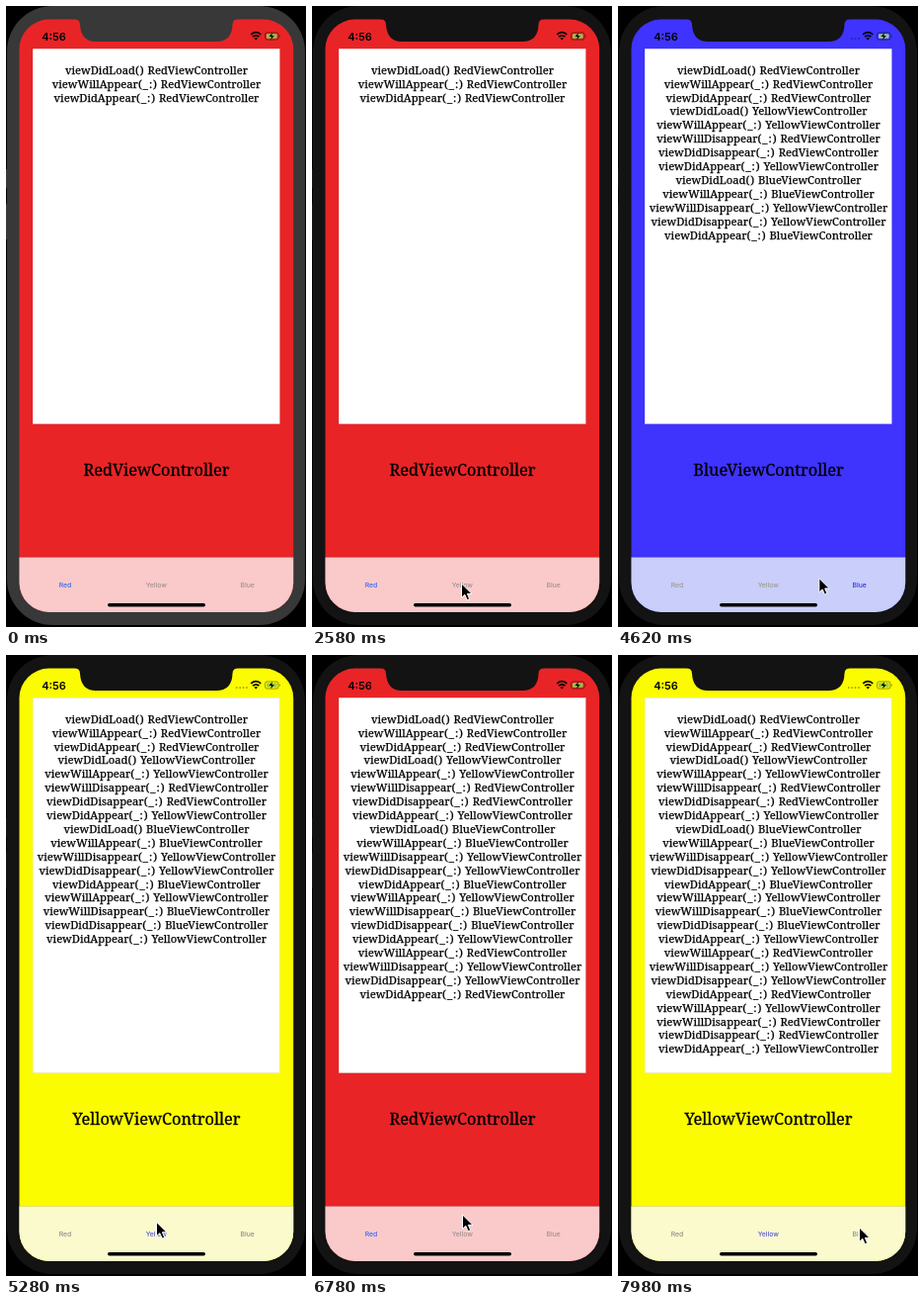
Recreate the animation shown at these times as an HTML page. Size 304 px wide and 628 px high, loop 8000 ms.

```html
<!DOCTYPE html>
<html lang="en">
<head>
<meta charset="utf-8">
<title>View controller life cycle</title>
<style>
html, body { margin: 0; width: 100%; height: 100%; overflow: hidden; background: #000; }
svg { display: block; width: 100%; height: 100%; }
text { text-anchor: middle; }
.log { font: 11.2px "Noto Serif", serif; stroke: #000; stroke-width: .25px; }
.args { letter-spacing: 1px; }
.title { font: 16.35px "Noto Serif", serif; stroke: #000; stroke-width: .3px; }
.clock { font: 600 11px Inter, sans-serif; }
.tab { font: 500 6.8px Inter, sans-serif; }
</style>
</head>
<body>
<svg viewBox="0 0 304 628">
  <rect width="304" height="628" fill="#000"/>
  <g id="bezel">
    <rect x="0" y="165" width="2" height="19"/>
    <rect x="0" y="200" width="2" height="36"/>
    <rect x="1" y="0" width="302" height="626" rx="46"/>
  </g>
  <clipPath id="screen"><rect x="13.5" y="13.6" width="277.7" height="599.3" rx="30"/></clipPath>
  <g clip-path="url(#screen)">
    <rect id="page" x="13" y="13" width="279" height="600"/>
    <rect id="bar" x="13" y="557.5" width="279" height="56"/>
    <path d="M13 557.5H292" stroke="#000" stroke-opacity=".2" stroke-width=".5"/>
  </g>
  <path id="notch" d="M69 13Q75 13.5 75 19Q76 36 91 36H213Q229 36 229.5 19Q229.5 13.5 235.5 13Z"/>
  <rect x="27.1" y="43.2" width="250.4" height="379.5" fill="#fff" stroke="#000" stroke-opacity=".12" stroke-width=".5"/>
  <g id="log"></g>
  <text id="title" class="title" x="152.5" y="475.4"></text>
  <text class="clock" x="48.5" y="34.6">4:56</text>
  <g id="dots" fill="#000" fill-opacity=".35"></g>
  <g fill="none" stroke="#000" stroke-width="1.7">
    <path d="M248.2 28.8Q253.2 24.4 258.2 28.8"/>
    <path d="M250 31.2Q253.2 28.5 256.4 31.2"/>
  </g>
  <path d="M251.4 32.6Q253.2 31.2 255 32.6L253.2 34.6Z"/>
  <rect x="262.6" y="26.9" width="13.4" height="7.2" rx="2" fill="none" stroke="#000" stroke-opacity=".5" stroke-width=".8"/>
  <path d="M277.2 29V32Q278.6 30.5 277.2 29Z" fill-opacity=".6"/>
  <rect id="charge" x="264" y="28.2" width="10.6" height="4.6" rx="1"/>
  <path d="M270 27L266.5 31H269L268.2 34.2L271.8 29.9H269.3Z"/>
  <g id="tabs"></g>
  <rect x="103" y="604.1" width="99" height="3.4" rx="1.7"/>
  <path id="cursor" d="M0 0V14.4L3.3 11.3L5.7 16.7L8.2 15.6L5.9 10.4H10.5Z" fill="#000" stroke="#fff" stroke-width="1" stroke-linejoin="round"/>
</svg>
<script>
const LOOP = 8000, STEP = 60;
const $ = id => document.getElementById(id);
const themes = {
  Red: { page: "#e92427", bar: "#facaca", on: "#2f66f4", off: "#a18f8f", charge: "#8fc64c", dots: 0 },
  Yellow: { page: "#fcfc00", bar: "#fafacd", on: "#5454dc", off: "#8c8c8c", charge: "#a4cf45", dots: 4 },
  Blue: { page: "#3f33fe", bar: "#c9cefb", on: "#3034e4", off: "#9c9a90", charge: "#8fc68c", dots: 3 }
};
const visits = [[0, "Red"], [2820, "Yellow"], [4140, "Blue"], [5160, "Yellow"], [6300, "Red"], [7200, "Yellow"]];
// Pointer stops: time, x, y
const stops = [
  [1500, 306, 612], [2340, 151.5, 584], [2940, 151.5, 584], [3720, 244.5, 587], [4260, 244.5, 587],
  [5040, 152.5, 568], [5340, 152.5, 574], [5940, 68.5, 582], [6360, 68.5, 582], [6780, 152.5, 566],
  [7320, 152.5, 570], [7860, 244.5, 579], [8000, 244.5, 579]
];

function add(parent, tag, attrs, content = "") {
  const el = document.createElementNS("http://www.w3.org/2000/svg", tag);
  for (const key in attrs) el.setAttribute(key, attrs[key]);
  el.textContent = content;
  parent.append(el);
  return el;
}

// Each visit logs the callbacks of the page that opens and the one that closes.
const lines = [], counts = [], loaded = new Set();
visits.forEach(([, name], i) => {
  const put = (call, args, who) => lines.push([call, args, ` ${who}ViewController`]);
  const last = i && visits[i - 1][1];
  if (!loaded.has(name)) put("viewDidLoad", "()", name);
  loaded.add(name);
  put("viewWillAppear", "(_:)", name);
  if (last) {
    put("viewWillDisappear", "(_:)", last);
    put("viewDidDisappear", "(_:)", last);
  }
  put("viewDidAppear", "(_:)", name);
  counts.push(lines.length);
});

const rows = lines.map(([call, args, who], i) => {
  const row = add($("log"), "text", { class: "log", x: 152.5, y: 68.7 + i * 13.9 }, call);
  add(row, "tspan", { class: "args" }, args);
  row.append(who);
  return row;
});
const tabs = Object.keys(themes).map((s, i) => add($("tabs"), "text", { class: "tab", x: 60 + i * 92.3, y: 588 }, s));
const dots = [0, 1, 2, 3].map(i => add($("dots"), "circle", { cx: 244 - i * 3.4, cy: 33, r: .9 }));

function pointer(t) {
  const i = stops.findIndex(s => s[0] > t);
  if (i < 1) return null;
  const [t0, x0, y0] = stops[i - 1], [t1, x1, y1] = stops[i];
  const p = (t - t0) / (t1 - t0), k = p * p * (3 - 2 * p);
  return [x0 + (x1 - x0) * k, y0 + (y1 - y0) * k];
}

function draw(t) {
  const n = visits.filter(v => v[0] <= t).length - 1;
  const name = visits[n][1], theme = themes[name];
  const frame = t < 2580 ? "#383838" : "#131313";
  $("bezel").setAttribute("fill", frame);
  $("notch").setAttribute("fill", frame);
  for (const id of ["page", "bar", "charge"]) $(id).setAttribute("fill", theme[id]);
  $("title").textContent = name + "ViewController";
  rows.forEach((r, i) => r.setAttribute("visibility", i < counts[n] ? "visible" : "hidden"));
  tabs.forEach(el => el.setAttribute("fill", el.textContent === name ? theme.on : theme.off));
  dots.forEach((d, i) => d.setAttribute("visibility", i < theme.dots ? "visible" : "hidden"));
  const at = pointer(t);
  $("cursor").setAttribute("visibility", at ? "visible" : "hidden");
  if (at) $("cursor").setAttribute("transform", `translate(${at})`);
}

const start = performance.now();
function tick(now) {
  const t = Math.max(0, now - start) % LOOP;
  draw(Math.floor(t / STEP) * STEP);
  requestAnimationFrame(tick);
}
draw(0);
requestAnimationFrame(tick);
</script>
</body>
</html>
```
